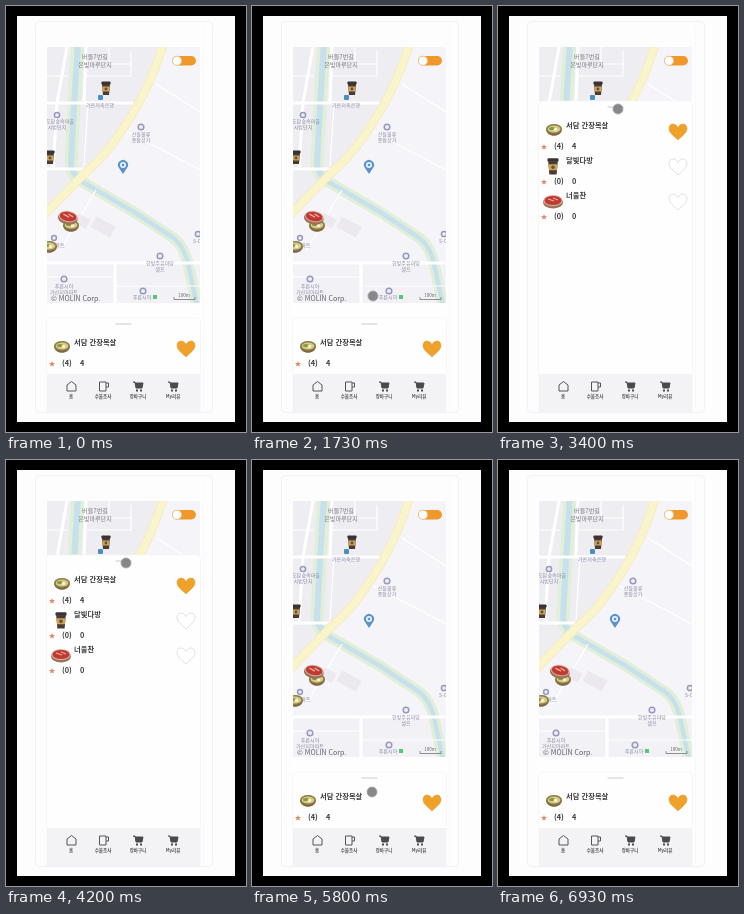
Recreate the animation shown at these times as an HTML page. Size 240x426 px, loop 6.99 s.

```html
<!DOCTYPE html>
<html lang="ko">
<head>
<meta charset="utf-8">
<title>Map with pull-up list</title>
<style>
html, body { margin: 0; width: 100%; height: 100%; overflow: hidden; background: #000; }
svg { display: block; width: 240px; height: 426px; font-family: "Noto Sans CJK KR", "Noto Sans CJK", "Noto Sans", sans-serif; }
.road, .river, .highway { fill: none; stroke-linejoin: round; }
.road { stroke: #fff; stroke-width: 3; }
.road .thin { stroke-width: 1.2; }
.place text { font-size: 5.1px; text-anchor: middle; fill: #8f8da8; }
.place circle { fill: #eeeefa; stroke: #9599bd; stroke-width: 1.5; }
.place .big { font-size: 6.1px; fill: #7c7a84; }
.item text { font-size: 7.3px; font-weight: 700; fill: #3c3a3b; }
.nav text { font-size: 4.5px; font-weight: 700; text-anchor: middle; fill: #555; }
.nav .line { fill: none; stroke: #555; stroke-width: 1; stroke-linejoin: round; }
.sheet { animation: sheet 6990ms linear infinite; }
.cursor { animation: move 6990ms linear infinite, show 6990ms linear infinite; }
@keyframes sheet {
  0%, 29.5% { transform: translateY(312px); animation-timing-function: ease-in; }
  38.2% { transform: translateY(237px); animation-timing-function: ease-out; }
  45%, 61% { transform: translateY(95px); animation-timing-function: ease-in-out; }
  78%, 100% { transform: translateY(312px); }
}
@keyframes move {
  0%, 10.44% { transform: translate(117px, 294px); }
  24.75% { transform: translate(121px, 290px); animation-timing-function: ease-in-out; }
  28.5% { transform: translate(121px, 314px); animation-timing-function: ease-in-out; }
  38.2% { transform: translate(127px, 138px); animation-timing-function: ease-out; }
  45%, 61% { transform: translate(120px, 103px); animation-timing-function: ease-in-out; }
  78%, 100% { transform: translate(120px, 332px); }
}
@keyframes show {
  0%, 8.5% { opacity: 0; }
  9.5%, 85% { opacity: 1; }
  87%, 100% { opacity: 0; }
}
</style>
</head>
<body>
<svg viewBox="0 0 240 426">
  <defs>
    <clipPath id="screen"><rect x="41" y="41" width="153" height="256"/></clipPath>
    <clipPath id="list"><rect x="39" y="41" width="157" height="326"/></clipPath>
    <path id="heart" d="M0 8C-4 4-9 1-9-3.5C-9-9-2.5-9.5 0-4.5C2.5-9.5 9-9 9-3.5C9 1 4 4 0 8Z"/>
    <path id="star" d="M0-3L.8-1L3-.9L1.3.5L1.9 2.6L0 1.4L-1.9 2.6L-1.3.5L-3-.9L-.8-1Z" fill="#e08a63"/>
    <path id="upper" d="M72 36L68 100L65 158Q66 168 76 176"/>
    <path id="lower" d="M73 174L80 178L128 206L166 231Q179 240 183 262L191 300"/>
    <path id="avenue" d="M158 36Q143 87 112 130Q99 150 78 168L38 209"/>
    <g id="cup">
      <path d="M-4-4H4L3 7H-3Z" fill="#4b3a30"/>
      <path d="M-3.7-1.5H3.7L3.3 3.5H-3.3Z" fill="#c9a45f"/>
      <rect x="-4.6" y="-6.5" width="9.2" height="3" rx="1" fill="#393333"/>
      <circle cy="1" r="1.4" fill="#6a4c33"/>
    </g>
    <g id="stew">
      <path d="M-8-1C-8 8 8 8 8-1Z" fill="#7d6642"/>
      <ellipse cy="-1" rx="8" ry="5" fill="#8d7c45"/>
      <ellipse cy="-1" rx="6.3" ry="3.6" fill="#d9cb86"/>
      <ellipse cx="-2" cy="-1.5" rx="3" ry="1.5" fill="#7f9b45"/>
      <circle cx="1.5" cy="-.5" r="1.8" fill="#f6f0d6"/>
    </g>
    <g id="meat">
      <ellipse cy="1.5" rx="10" ry="6" fill="#9b7355"/>
      <ellipse cy="-.5" rx="9.5" ry="5.5" fill="#d8b3a4"/>
      <ellipse cy="-.5" rx="8.5" ry="4.6" fill="#c03a32"/>
      <path d="M-5-2L1 0M0-3L5-1" stroke="#f1aaa0" stroke-width="1.3"/>
    </g>
    <g id="cart" fill="none" stroke="#4a4a4a" stroke-linejoin="round">
      <path d="M-5-4H-3L-2 2H4L5-3H-3" fill="#4a4a4a"/>
      <path d="M-2 4.5H0M2 4.5H4" stroke-width="1.8"/>
    </g>
  </defs>

  <rect x="11" y="10" width="218" height="406" fill="#fdfdfe"/>
  <rect x="29.5" y="15.5" width="177" height="391" rx="4" fill="none" stroke="#f0f0f7"/>
  <path d="M197.5 20V402" stroke="#f9f9fc"/>
  <rect x="40" y="41" width="155" height="365" fill="#fefefe"/>

  <g clip-path="url(#screen)">
    <rect x="41" y="41" width="153" height="256" fill="#f5f4f8"/>
    <path d="M41 41H157Q140 100 82 163L41 206Z" fill="#eeedf2"/>
    <path d="M41 258H194V297H41Z" fill="#f2f1f6"/>
    <g class="river">
      <g stroke="#e0efd6">
        <use href="#upper" stroke-width="13"/>
        <use href="#lower" stroke-width="11"/>
      </g>
      <g stroke="#c6e0ee">
        <use href="#upper" stroke-width="6"/>
        <use href="#lower" stroke-width="4.5"/>
      </g>
    </g>
    <g class="road">
      <path d="M41 97H127M41 163H84M41 257H194M109 257V297M61 41L51 97L47 163M80 41L78 97"/>
      <path class="thin" d="M41 70H62M41 271H109M82 97L78 160M109 280H194M80 70H125V45M103 41V58H126M150 78L194 106M120 125L194 164M90 184L54 245"/>
    </g>
    <g class="highway">
      <use href="#avenue" stroke="#f4ecc4" stroke-width="9"/>
      <use href="#avenue" stroke="#faf4cb" stroke-width="7"/>
    </g>
    <g fill="#ece8f0">
      <rect x="-11" y="-6" width="22" height="12" transform="translate(97 221) rotate(28)"/>
      <rect x="-7" y="-5" width="14" height="10" transform="translate(76 215) rotate(28)"/>
    </g>

    <g class="place">
      <text class="big" x="89" y="53">버들7번길</text><text class="big" x="89" y="61">은빛마루단지</text>
      <rect x="92" y="89" width="5" height="5" rx="1" fill="#4a8fc4"/><text x="94" y="101">가온저축은행</text>
      <circle cx="51" cy="109" r="2.6"/><text x="54" y="117">도담숲속마을</text><text x="51" y="123">시범단지</text>
      <circle cx="135" cy="121" r="2.8"/><text x="135" y="130">산들물류</text><text x="135" y="136">종합상가</text>
      <circle cx="192" cy="228" r="2.6"/><text x="191" y="237">S-C</text>
      <circle cx="48" cy="232" r="2.4"/><text x="54" y="241">마트</text>
      <circle cx="154" cy="250" r="2.8"/><text x="154" y="259">한빛주유마당</text><text x="154" y="265">셀프</text>
      <circle cx="58" cy="273" r="2.8"/><text x="58" y="282">푸른시아</text><text x="58" y="288">가산지아파트</text>
      <circle cx="137" cy="285" r="2.8"/><text x="136" y="293">푸른시아</text>
    </g>
    <rect x="147" y="289" width="4" height="4" fill="#53c878"/>
    <path d="M168 291V293.5H189V291" fill="none" stroke="#777" stroke-width=".8"/>
    <text x="178" y="291" font-size="4.5" text-anchor="middle" fill="#666">100m</text>
    <text x="45" y="295" font-size="7" fill="#606064">© MOLIN Corp.</text>

    <use href="#cup" x="100" y="82"/>
    <use href="#cup" x="44" y="151"/>
    <use href="#stew" x="65" y="220"/>
    <use href="#meat" transform="translate(62 211) rotate(10)"/>
    <use href="#stew" x="43" y="241"/>
    <path d="M117 168L113 162A5 5 0 1 1 121 162Z" fill="#5b92cc"/>
    <circle cx="117" cy="159" r="3" fill="#eaf3fb"/><circle cx="117" cy="159" r="1.3" fill="#5b92cc"/>
    <rect x="166" y="50" width="24" height="9.5" rx="4.75" fill="#f0992a"/>
    <circle cx="171" cy="54.75" r="4.6" fill="#fff" stroke="#e5c08a" stroke-width=".7"/>
  </g>

  <g clip-path="url(#list)">
    <g class="sheet">
      <path d="M40.5 330V4Q40.5 0 44.5 0H190.5Q194.5 0 194.5 4V330Z" fill="#fefefe" stroke="#f4f4f8" stroke-width=".7"/>
      <path d="M110 6H125" stroke="#dcdce0" stroke-width="1.3" stroke-linecap="round"/>
      <g class="item">
        <use href="#stew" x="56" y="29"/><text x="68" y="27">서담 간장목살</text>
        <use href="#heart" x="180" y="31" fill="#f0a129" stroke="#dc9530" stroke-width=".5"/>
        <use href="#star" x="46" y="46"/><text x="56" y="48">(4)</text><text x="74" y="48">4</text>
      </g>
      <g class="item" transform="translate(0 35)">
        <use href="#cup" transform="translate(55 30) scale(1.2)"/><text x="68" y="27">달빛다방</text>
        <use href="#heart" x="180" y="31" fill="#fff" stroke="#d9d9dc" stroke-width=".8"/>
        <use href="#star" x="46" y="46"/><text x="56" y="48">(0)</text><text x="74" y="48">0</text>
      </g>
      <g class="item" transform="translate(0 70)">
        <use href="#meat" x="55" y="30"/><text x="68" y="27">너울찬</text>
        <use href="#heart" x="180" y="31" fill="#fff" stroke="#d9d9dc" stroke-width=".8"/>
        <use href="#star" x="46" y="46"/><text x="56" y="48">(0)</text><text x="74" y="48">0</text>
      </g>
    </g>
  </g>

  <rect x="40.500" y="368" width="154" height="38" fill="#f3f3f6"/>
  <g class="nav">
    <path class="line" d="M61 385V379L65.5 375.5L70 379V385Z"/><text x="65" y="392">홈</text>
    <path class="line" d="M93.5 376H100V385H93.5ZM100 377H102.5V381H100"/><text x="97" y="392">수불조사</text>
    <use href="#cart" x="132" y="380"/><text x="132" y="392">장바구니</text>
    <use href="#cart" x="167" y="380"/><text x="167" y="392">My리뷰</text>
  </g>

  <circle class="cursor" r="5" fill="#77777a" fill-opacity=".88" stroke="#a5a5a8" stroke-width=".8"/>
</svg>
</body>
</html>
```
